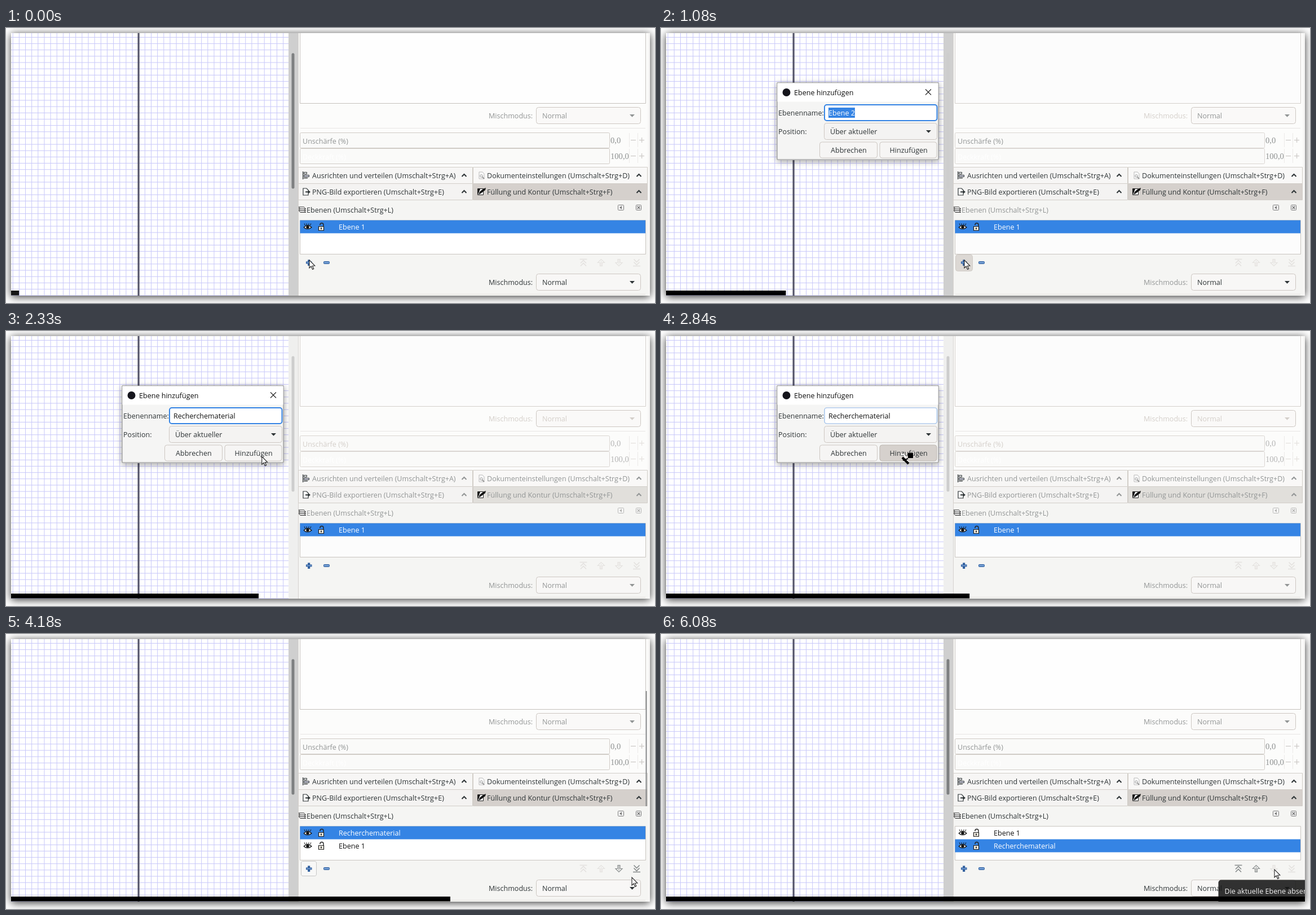
These frames come from a looping animation (1151 by 487 pixels, 6.18 s). An HTML page with a canvas:

```html
<!DOCTYPE html>
<html lang="de">
<head>
<meta charset="utf-8">
<title>Ebene hinzufügen</title>
<style>
html, body { margin: 0; width: 100%; height: 100%; overflow: hidden; background: #fff; }
canvas { display: block; width: 1151px; height: 487px; }
</style>
</head>
<body>
<canvas id="stage" width="1151" height="487"></canvas>
<script>
const ctx = document.getElementById('stage').getContext('2d');
const LOOP = 6180;
const SANS = '"Open Sans", "Noto Sans", sans-serif';
const UI = '12.55px ' + SANS;
const SERIF = '14.6px "Liberation Serif", serif';
const BLUE = '#3584e4', DARK = '#2e3436', DIM = '#929595', FAINT = '#d4cfca', EDGE = '#cdc7c2';

// Tick groups: first tick, last tick, count
const GROUPS = [[0, 0, 1], [70, 670, 7], [780, 1290, 6], [1400, 1910, 6], [2020, 2530, 6], [2640, 3150, 6],
  [3260, 3780, 6], [3890, 4480, 7], [4590, 5130, 6], [5230, 5740, 6], [5850, 6080, 4]];
const TICKS = GROUPS.flatMap(([a, b, n]) =>
  Array.from({ length: n }, (_, i) => n < 2 ? a : Math.floor((a + (b - a) * i / (n - 1)) / 10) * 10));

// Pointer path: time, x, y
const PATH = [[0, 538, 411], [1190, 538, 411], [1600, 473, 302], [2120, 473, 302], [2430, 446, 190],
  [2640, 426, 216], [3260, 426, 216], [3780, 760, 275], [4180, 1110, 431], [4480, 1088, 417], [LOOP, 1088, 417]];

function pointerAt(t) {
  const i = PATH.findIndex(p => p[0] > t);
  const [t0, x0, y0] = PATH[i - 1], [t1, x1, y1] = PATH[i];
  const k = (t - t0) / (t1 - t0), e = k * k * (3 - 2 * k);
  return [x0 + (x1 - x0) * e, y0 + (y1 - y0) * e];
}

function rect(x, y, w, h, color) {
  ctx.fillStyle = color;
  ctx.fillRect(x, y, w, h);
}

function box(x, y, w, h, r, fill, edge, width = 1) {
  ctx.beginPath();
  ctx.roundRect(x + .5, y + .5, w - 1, h - 1, r);
  if (fill) { ctx.fillStyle = fill; ctx.fill(); }
  if (edge) { ctx.strokeStyle = edge; ctx.lineWidth = width; ctx.stroke(); }
}

function text(s, x, y, color, font = UI) {
  ctx.font = font;
  ctx.fillStyle = color;
  ctx.fillText(s, x, y);
}

// Open or closed polyline given as x, y, x, y, ...
function trace(pts, close) {
  ctx.beginPath();
  for (let i = 0; i < pts.length; i += 2) ctx.lineTo(pts[i], pts[i + 1]);
  if (close) ctx.closePath();
}

function line(pts, color, width = 1) {
  trace(pts);
  ctx.strokeStyle = color;
  ctx.lineWidth = width;
  ctx.stroke();
}

function poly(pts, fill, edge, width = 1) {
  trace(pts, true);
  ctx.fillStyle = fill;
  ctx.fill();
  if (edge) { ctx.strokeStyle = edge; ctx.lineWidth = width; ctx.stroke(); }
}

function at(x, y, draw) {
  ctx.save();
  ctx.translate(x, y);
  draw();
  ctx.restore();
}

function shadowBox(x, y, w, h, color, blur, dy) {
  ctx.save();
  ctx.shadowColor = color;
  ctx.shadowBlur = blur;
  ctx.shadowOffsetY = dy;
  rect(x, y, w, h, '#fff');
  ctx.restore();
}

const chevron = (x, y, color) => line([x - 4, y + 2, x, y - 2, x + 4, y + 2], color, 2);
const triangle = (x, y, color) => poly([x - 4.5, y - 2, x + 4.5, y - 2, x, y + 2.8], color);

function combo(x, y, w, label, color, fill) {
  box(x, y, w, 30, 4, fill, EDGE);
  text(label, x + 11, y + 19.5, color);
  triangle(x + w - 15.5, y + 15, color);
}

function grid() {
  const gap = 11.15;
  ctx.save();
  ctx.beginPath();
  ctx.rect(9, 9, 492, 465);
  ctx.clip();
  for (let x = 235.2 - 20 * gap; x < 501; x += gap) rect(x - .5, 9, 1, 465, '#c8c8f9');
  for (let y = 16.5; y < 474; y += gap) rect(9, y - .5, 492, 1, '#c8c8f9');
  rect(233.5, 9, 3.2, 465, '#55556a');
  ctx.restore();
}

function tabIcon(kind, x, y) {
  at(x, y, () => {
    if (kind === 'align') {
      rect(-6, -7, 1.3, 14, DARK);
      box(-4, -6, 6, 4, 0, '#eee', DARK);
      box(-4, -1, 10, 4, 0, '#ccd', DARK);
      rect(-4, 4, 7, 1.3, DARK);
    } else if (kind === 'export') {
      poly([-5, -6, 1, -6, 4, -3, 4, 6, -5, 6], '#fff', DARK, 1.2);
      rect(-1, -.7, 6, 2, DARK);
      poly([4, -3, 8, .3, 4, 3.6], DARK);
    } else if (kind === 'document') {
      poly([-4, -6, 2, -6, 5, -3, 5, 6, -4, 6], '#fafafa', '#bbb');
      ctx.beginPath(); ctx.arc(0, 1, 2.2, 0, 7); ctx.strokeStyle = '#999'; ctx.stroke();
      line([1.5, 2.5, 5, 6], '#888', 1.6);
    } else {
      box(-7, -6, 11, 12, 0, '#fff', '#222');
      poly([-6, -5, -2, -5, -6, 5], '#111');
      poly([8, -7, 7, -3, -1, 3, -5, 5, -3, 0, 3, -5], '#111');
    }
  });
}

function tab(x, y, kind, label, fill, color) {
  box(x, y, 310, 30, 0, fill, '#d2cec9');
  tabIcon(kind, x + (x > 800 ? 15 : 14), y + 15);
  text(label, x + 25, y + 19.5, color);
  chevron(x + 294.5, y + 15, color);
}

function eye(x, y) {
  at(x, y, () => {
    ctx.beginPath();
    ctx.moveTo(-7, 1);
    ctx.quadraticCurveTo(0, -6, 7, 1);
    ctx.quadraticCurveTo(0, 7, -7, 1);
    ctx.fillStyle = '#eee'; ctx.fill();
    ctx.strokeStyle = '#111'; ctx.lineWidth = 1.2; ctx.stroke();
    ctx.beginPath(); ctx.arc(0, .8, 2.7, 0, 7); ctx.fillStyle = '#111'; ctx.fill();
    for (const d of [-4.5, -1.6, 1.6, 4.5]) line([d, -2.5, d * 1.3, -5.8], '#111');
  });
}

function lock(x, y) {
  at(x, y, () => {
    ctx.beginPath();
    ctx.moveTo(-2.5, -3);
    ctx.arc(1, -3.5, 3, Math.PI, 0);
    ctx.lineTo(4, 0);
    ctx.strokeStyle = '#222'; ctx.lineWidth = 1.4; ctx.stroke();
    box(-5, -1, 10, 8, 0, '#f0ebe0', '#222', 1.2);
    rect(-1, 1.5, 2, 3, '#333');
  });
}

function layerRow(y, label, chosen) {
  if (chosen) rect(521.5, y, 612.5, 23, BLUE);
  eye(535, y + 11.5);
  lock(559, y + 11.5);
  text(label, 590, y + 16.5, chosen ? '#fff' : '#111');
}

// dir -1 is up, 1 is down; bar marks "to the end"
function arrowIcon(x, dir, bar, on) {
  const color = on ? '#8a8e8e' : '#e4e2df';
  at(x, 415.5, () => {
    ctx.scale(1, dir);
    if (bar) {
      line([-6.5, 6, 6.5, 6], color, 1.6);
      line([-5, -1, 0, 4, 5, -1], color, 1.7);
      line([-5, -6, 0, -1, 5, -6], color, 1.7);
    } else {
      trace([-2, -6, 2, -6, 2, 0, 6, 0, 0, 6, -6, 0, -2, 0], true);
      ctx.strokeStyle = color; ctx.lineWidth = 1.2; ctx.stroke();
      line([0, -6, 0, 3], color, 1);
    }
  });
}

function upperPanel(s) {
  const weak = s.labels ? FAINT : DIM;
  const tone = s.tabs ? FAINT : DIM;
  const sign = s.tabs ? '#e4e1de' : '#cbc8c5';
  rect(518, 9, 620, 238, '#fcfcfb');
  rect(521, 9, 613, 125, s.labels ? '#fcfcfc' : '#fefefe');
  line([521.5, 9, 521.5, 133.5, 1134.5, 133.5, 1134.5, 9], s.labels ? '#d5d0cc' : '#c6c2bd');
  rect(518, 9, 1, 465, '#d5d2cf');
  text('Mischmodus:', 856, 160, weak);
  combo(940, 140, 186, 'Normal', s.combos ? FAINT : DIM, '#faf9f8');
  rect(522, 177, 612, 1, '#e8e6e4');
  [['Unschärfe (%)', '0,0', 185, tone], ['Deckkraft (%)', '100,0', 213, '#fff']].forEach(([label, value, y, color]) => {
    box(521, y, 550, 28, 2, '#fafaf9', s.labels ? '#dad6d2' : '#d0cbc6');
    text(label, 526, y + 19.5, color);
    text(value, 1072, y + 18.5, s.tabs ? '#b5b5b5' : '#8d9090', SERIF);
    rect(1105, y + 1, 1, 25, '#eceae8');
    rect(1120, y + 1, 1, 25, '#eceae8');
    rect(1108, y + 13, 9, 1.2, sign);
    rect(1123, y + 13, 9, 1.2, sign);
    rect(1127, y + 9, 1.2, 9, sign);
  });
}

function tabs(s) {
  const color = s.tabs ? DIM : DARK;
  tab(518, 246, 'align', 'Ausrichten und verteilen (Umschalt+Strg+A)', '#f7f6f5', color);
  tab(828, 246, 'document', 'Dokumenteinstellungen (Umschalt+Strg+D)', '#f9f8f7', color);
  tab(518, 275, 'export', 'PNG-Bild exportieren (Umschalt+Strg+E)', '#f4f3f2', color);
  tab(828, 275, 'fill', 'Füllung und Kontur (Umschalt+Strg+F)', s.tabs ? '#e1dfdb' : '#d5d0cc', color);
}

function layerPanel(s, t) {
  const color = s.labels ? DIM : DARK;
  rect(519, 305, 619, 169, '#f5f5f3');
  for (const y of [326.5, 323.5, 320.5]) {
    poly([522, y, 531.5, y, 528.5, y - 3.5, 519, y - 3.5], '#fff', '#222');
  }
  text('Ebenen (Umschalt+Strg+L)', 533, 326.5, color);
  const small = s.tabs ? '#b5b5b3' : '#777';
  box(1085, 313, 11, 10, 1, '#fafafa', small);
  poly([1088, 318, 1092, 315, 1092, 321], small);
  box(1117, 313, 10, 10, 1, '#fafafa', small);
  line([1119.5, 315.5, 1124.5, 320.5], small, 1.6);
  line([1124.5, 315.5, 1119.5, 320.5], small, 1.6);

  box(521, 340, 614, 61, 0, s.labels ? '#fcfcfc' : '#fff', '#cac5c0');
  const added = t >= 3360, moved = t >= 4800;
  const names = !added ? ['Ebene 1'] : moved ? ['Ebene 1', 'Recherchematerial'] : ['Recherchematerial', 'Ebene 1'];
  names.forEach((name, i) => layerRow(340.5 + 23 * i, name, i === (moved ? 1 : 0)));

  if (t >= 270 && t < 1290) box(522, 401, 31, 30, 4, t < 470 ? '#fafaf9' : '#dcd8d4', '#d0cbc6');
  if (added && t < 4590) {
    box(523, 402, 28, 27, 3, '#f8f8f7');
    ctx.setLineDash([1, 1]);
    box(523, 402, 28, 27, 3, null, '#999');
    ctx.setLineDash([]);
  }
  if (t >= 4480 && t < 4800) box(1073, 401, 29, 30, 4, t < 4690 ? '#fafaf9' : '#dcd8d4', '#d0cbc6');
  rect(532, 413.5, 10.5, 4, '#2d5c9c');
  rect(535.2, 410.5, 4, 10.5, '#2d5c9c');
  rect(533, 414.7, 8.5, 1.6, '#7ba3d6');
  box(563, 413, 11, 5, 1, '#6f9ad0', '#2d5c9c');

  arrowIcon(1024, -1, true, moved);
  arrowIcon(1055.5, -1, false, moved);
  arrowIcon(1087, 1, false, added && !moved);
  arrowIcon(1118.5, 1, true, added && !moved);

  text('Mischmodus:', 856, 454.5, color);
  combo(940, 435, 186, 'Normal', s.combos ? DIM : DARK, '#f8f7f6');
  rect(522, 471, 612, 1, '#e4e1de');
}

function dialog(t) {
  const pressed = t >= 2740, pasted = t >= 1500;
  shadowBox(205.5, 97, 287, 137, 'rgba(0,0,0,.4)', 10, 2);
  box(205.5, 96.5, 287, 137, 0, '#f5f5f4', '#7b7b7b');
  rect(206.5, 97.5, 285, 33, '#fff');
  ctx.beginPath(); ctx.arc(222.5, 114, 7, 0, 7); ctx.fillStyle = '#15151c'; ctx.fill();
  text('Ebene hinzufügen', 236, 118.5, '#111');
  if (!pressed) {
    line([469, 108.5, 479, 118.5], '#222', 1.1);
    line([479, 108.5, 469, 118.5], '#222', 1.1);
  }
  text('Ebenenname:', 208, 155, DARK);
  box(289.5, 135.5, 200.5, 29, 4, '#fff', pressed ? '#8fb6e8' : BLUE, pressed ? 1.2 : 2);
  ctx.font = UI;
  if (pasted) {
    text('Recherchematerial', 297, 155, '#111');
    const end = 297 + ctx.measureText('Recherchematerial').width;
    if (t < 2230) rect(Math.round(end), 142, 1, 17, '#111');
  } else {
    rect(297, 141, ctx.measureText('Ebene 2').width, 18, BLUE);
    text('Ebene 2', 297, 155, '#fff');
  }
  text('Position:', 208, 188, DARK);
  combo(289, 168, 201, 'Über aktueller', DARK, '#f4f3f2');
  box(281, 201.5, 103, 29, 4, '#f6f5f4', EDGE);
  text('Abbrechen', 301, 221, DARK);
  box(387.5, 201.5, 102, 29, 4, pressed ? '#d6d1cd' : '#f6f5f4', pressed ? '#bdb7b1' : EDGE);
  text('Hinzufügen', 405.5, 221, DARK);
}

function pointer(t) {
  const [x, y] = pointerAt(t);
  if (t >= 2740 && t < 3050) {
    rect(438, 216, 9, 9, '#000');
    line([426, 219, 431, 219, 439, 233], '#fff', 2);
    line([428, 224, 439, 235], '#000', 4);
    line([429, 229, 438, 226], '#000', 2);
    return;
  }
  at(x, y, () => poly([0, 0, 0, 14, 3.2, 11, 5.6, 16.5, 7.8, 15.5, 5.4, 10.2, 9.8, 10], '#fff', '#222', 1.1));
}

function draw(t) {
  const away = t < 3260;
  const s = { labels: away && t >= 1080, tabs: away && t >= 1190, combos: away && t >= 1400 };
  rect(0, 0, 1151, 487, '#fff');
  shadowBox(9, 9, 1133, 465, 'rgba(0,0,0,.8)', 14, 2);
  grid();
  rect(501, 9, 17, 465, s.tabs ? '#efefee' : '#cfcfcf');
  box(506, 44, 6, 241, 3, s.labels ? '#cdcdcd' : '#7e8081');
  rect(1138, 9, 4, 465, '#f7f6f5');
  upperPanel(s);
  tabs(s);
  layerPanel(s, t);
  if (t >= 3360 && t < 5440) rect(1134.5, 101, 2, 204, '#85878a');
  if (t >= 980 && t < 3050) dialog(t);
  if (t >= 1500 && t < 2230) {
    rect(513, 428, 127, 46, '#000');
    text('Ctrl + V', 516.5, 462, '#fff', 'bold 32px ' + SANS);
  }
  pointer(t);
  if (t >= 5540) {
    ctx.save();
    ctx.beginPath();
    ctx.rect(988, 430, 154, 44);
    ctx.clip();
    box(988, 435, 170, 50, 5, 'rgba(20,20,20,.87)');
    text('Die aktuelle Ebene absenken', 999.5, 460, '#f4f4f4');
    ctx.restore();
  }
  const steps = Math.round(t / (LOOP / 80)) + 1;
  rect(9, 465, 1133 * steps / 80, 8.5, steps < 2 ? '#161616' : '#000');
}

function loop() {
  const now = performance.now() % LOOP;
  draw(TICKS.findLast(tick => tick <= now));
  requestAnimationFrame(loop);
}
loop();
</script>
</body>
</html>
```
